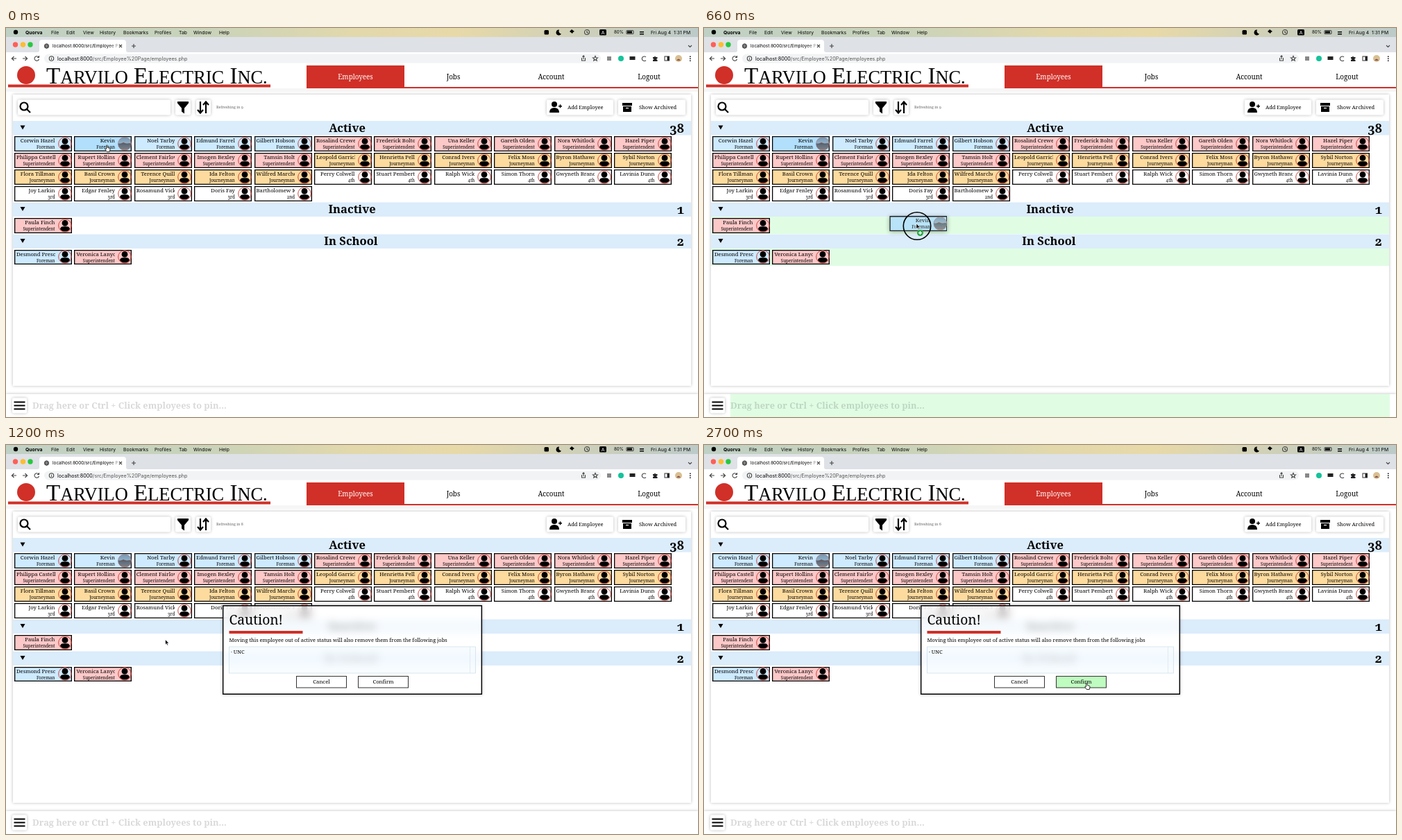
These frames come from a looping animation (997x561 px, 2730 ms). An HTML page:

```html
<!DOCTYPE html>
<html lang="en">
<head>
<meta charset="utf-8">
<title>Employees</title>
<style>
html, body { margin: 0; width: 997px; height: 561px; overflow: hidden; background: #fff; }
body { position: relative; font-family: "Noto Serif", serif; font-variant-numeric: oldstyle-nums; }
div, svg { position: absolute; box-sizing: border-box; }
svg { left: 0; top: 0; overflow: visible; }
.ui { font: 6.8px Inter, sans-serif; }
.mid { text-anchor: middle; }
.head { font-weight: 700; font-size: 16.5px; }
.count { font-weight: 700; font-size: 18px; text-anchor: end; }
.box { fill: #fff; filter: drop-shadow(0 0 2px #0004); }
.line { fill: none; stroke: #444; stroke-width: 1.1; }
.card { width: 83px; height: 21.5px; box-shadow: inset 0 0 0 1.3px #000; }
.card div { left: 3px; width: 55.5px; overflow: hidden; white-space: nowrap; text-align: right; }
.card .name { top: 1px; font-size: 7.7px; line-height: 10px; }
.card .role { top: 12px; font-size: 6.2px; line-height: 8px; }
.zone { left: 10px; width: 977px; background: #e0fde4; }
#pin { left: 38px; width: 950px; top: 528px; height: 33px; mix-blend-mode: multiply; }
#ghost { left: 0; top: 0; opacity: .85; filter: drop-shadow(0 1px 3px #0006); }
#modal { left: 311.5px; top: 231px; width: 374px; height: 128.5px; background: #ffffffb3;
  backdrop-filter: blur(6px); box-shadow: inset 0 0 0 1.4px #000, 0 0 4px #0005; }
</style>
</head>
<body>
<svg width="997" height="561">
  <defs>
    <linearGradient id="bar"><stop stop-color="#bfd0c4"/><stop offset=".3" stop-color="#cad3b9"/><stop offset=".5" stop-color="#e2d8ac"/><stop offset=".65" stop-color="#e8d9a8"/><stop offset=".82" stop-color="#cfd0b8"/><stop offset="1" stop-color="#bccac8"/></linearGradient>
    <linearGradient id="photo" x2="0" y2="1"><stop stop-color="#7797b4"/><stop offset=".45" stop-color="#8fb0c6"/><stop offset=".5" stop-color="#506c80"/><stop offset="1" stop-color="#8a7f80"/></linearGradient>
    <linearGradient id="fade"><stop offset=".85"/><stop offset="1" stop-opacity=".3"/></linearGradient>
    <path id="arrow" d="M-1-3.5v7.5l1.7-1.6 1.2 2.7 1.3-.6-1.2-2.6h2.3z" stroke="#fff" stroke-width=".7"/>
    <path id="hand" d="M-1.5-4.5q1-1 1.7 0v3l3 .8q1 .4.8 1.6l-.7 3.6h-4l-2.6-3.6q.3-1.2 1.8-.3z" fill="#fff" stroke="#000" stroke-width=".8"/>
  </defs>

  <!-- menu bar -->
  <rect width="997" height="13" fill="url(#bar)"/>
  <circle cx="14" cy="6" r="3.2"/>
  <g class="ui" id="menu"><text x="28" y="8.5" font-weight="700">Quorva</text>
    <text x="876" y="8.3" style="font-size:6.2px">80%</text><text x="929" y="8.5">Fri Aug 4&#160; 1:31 PM</text></g>
  <rect x="775.5" y="3" width="6.5" height="6.5" rx="1.5"/>
  <path d="M797 2.5a4 4 0 1 0 3 6 4 4 0 0 1-3-6M815 2l4 3-2 1-1 2-4-3zM814 6l-3 4"/>
  <circle class="line" cx="837" cy="6" r="3.5"/><path class="line" d="M837 4v2.5l2 1"/>
  <rect x="855" y="2" width="10" height="8.5" rx="1.5"/><text x="860" y="8.8" class="ui mid" fill="#fff">A</text>
  <rect class="line" x="894" y="3.5" width="10" height="5" rx="1.3"/><rect x="895" y="4.5" width="7" height="3"/>
  <path d="M913 5h6v1.5h-6zM913 8h6v1.5h-6z"/>

  <!-- tab strip and toolbar -->
  <rect y="13" width="997" height="23" fill="#dee1e6"/>
  <path d="M45 35q3 0 3-3V21q0-4 4-4h117q4 0 4 4v11q0 3 3 3z" fill="#fff"/>
  <rect y="35" width="997" height="19" fill="#fff"/>
  <rect x="55" y="37.5" width="802" height="13" rx="6.5" fill="#f1f3f4"/>
  <circle cx="13.5" cy="24" r="3.7" fill="#ff5f57"/><circle cx="24.5" cy="24" r="3.7" fill="#febc2e"/><circle cx="35" cy="24" r="3.7" fill="#28c840"/>
  <g class="line"><circle cx="58.5" cy="26" r="3"/><path d="M55.5 26h6M58.5 23q-3 3 0 6q3-3 0-6M163 24l4 4m0-4l-4 4M181 26h6m-3-3v6M983 25l2.5 2.5 2.5-2.5"/>
    <path d="M15 44H8.5l3-3m-3 3l3 3M24 44h6.5l-3-3m3 3l-3 3M47 42a3.3 3.3 0 1 0 .5 3M47.5 40v2.5h-2.5"/>
    <circle cx="65.5" cy="44" r="3.2"/><path d="M65.5 43.5v2.3M65.5 41.8v.8M829.5 43v4h5v-4M832 45v-5l-1.5 1.5M832 40l1.5 1.5M922 42a3.3 3.3 0 1 0 0 4.5"/>
    <path d="M849 40.5l1 2.3 2.5.2-2 1.6.7 2.4-2.2-1.3-2.2 1.3.7-2.4-2-1.6 2.5-.2z"/><rect x="949" y="41" width="6.5" height="6"/></g>
  <rect x="866" y="41" width="6" height="6" fill="#888"/><circle cx="886" cy="44" r="4" fill="#15c39a"/>
  <path d="M898.5 41h8v5h-8zM932 42h2q1-3 2 0h2.5v2q-3 1 0 2v2H932v-2q3-1 0-2zM952.5 41h3v6h-3z" fill="#222"/>
  <circle cx="969" cy="44" r="5" fill="#d9bf91"/><path d="M966 47q3-5 6 0z" fill="#855"/>
  <path d="M985 40.5h1.5v1.5H985zm0 3h1.5V45H985zm0 3h1.5V48H985z"/>
  <text class="ui" x="67" y="28.3" style="font-size:6.4px" fill="url(#fade)">localhost:8000/src/Employee P</text>
  <text class="ui" x="74" y="46.7" style="font-size:7.2px">localhost:8000<tspan fill="#555">/src/Employee%20Page/employees.php</tspan></text>

  <!-- page header -->
  <rect y="87" width="997" height="5" fill="#f6f6f6"/>
  <circle cx="29" cy="68" r="13" fill="#d03028"/><rect x="3" y="81.5" width="378" height="4" fill="#d03028"/>
  <text x="58" y="80" font-family="Liberation Serif, serif" font-size="33">T<tspan font-size="26.4">ARVILO</tspan> E<tspan font-size="26.4">LECTRIC</tspan> I<tspan font-size="26.4">NC.</tspan></text>
  <path d="M433 54h141v31h423v2H433z" fill="#d03028"/>
  <g class="mid" font-size="9.85"><text x="503.5" y="73.5" fill="#fff">Employees</text><text x="644.5" y="73.5">Jobs</text><text x="785.5" y="73.5">Account</text><text x="926.5" y="73.5">Logout</text></g>

  <!-- panel and controls -->
  <rect class="box" x="10" y="96" width="977" height="420"/>
  <g id="controls"></g>
  <g fill="none" stroke="#000" stroke-width="2.2"><circle cx="26" cy="113" r="5.5"/><path d="M30 117l5 5M280 106v16m-4-4l4 4.5 4-4.5M288 123v-16m-4 4l4-4.5 4 4.5"/></g>
  <path d="M247 106h16v2.5l-6 7v8l-4-3v-5l-6-7z"/>
  <circle cx="790" cy="110" r="4"/><path d="M783 122q0-7 7-7t7 7zM796 112h5v1.5h-5zM797.8 110.2h1.5v5h-1.5zM888 108h14v4h-14zM889 113h12v8h-12z"/><path d="M893 115.5h4" stroke="#fff" stroke-width="1.3"/>
  <g font-size="7.5"><text x="809" y="117">Add Employee</text><text x="912" y="117">Show Archived</text></g>
  <text id="refresh" x="303" y="116" font-size="5.4" fill="#666"></text>
  <g id="sections"></g>

  <!-- pin bar -->
  <rect class="box" y="528" width="997" height="40"/><rect class="box" x="9" y="533.5" width="21" height="22" rx="2"/>
  <path d="M11.5 539.5h16M11.5 544.5h16M11.5 549.5h16" stroke="#000" stroke-width="2.2"/>
  <text x="38" y="549" font-size="12.75" font-weight="700" fill="#d9d9d9">Drag here or Ctrl + Click employees to pin...</text>
</svg>

<div id="zones">
  <div class="zone" style="top:272px;height:25px"></div><div class="zone" style="top:318px;height:24.5px"></div>
</div>
<div class="zone" id="pin"></div>
<div id="cards"></div>

<div id="modal"><svg width="374" height="128"><g transform="translate(-311.5 -231)">
  <text x="321" y="259" font-size="19.2">Caution!</text><rect x="321" y="268" width="106" height="4" fill="#d03028"/>
  <text x="321" y="284" font-size="7.5">Moving this employee out of active status will also remove them from the following jobs</text>
  <rect x="321" y="291" width="355" height="38" fill="#eef7ff66" stroke="#cfe0ea" stroke-width=".8"/><path d="M668 291v38" stroke="#dce8ef" stroke-width=".8"/>
  <text x="323.5" y="301" font-size="7.5">· UNC</text>
  <g stroke="#333" fill="#fff"><rect x="418" y="333.5" width="72" height="16.5"/><rect id="confirm" x="507" y="333.5" width="72" height="16.5"/></g>
  <g class="mid" font-size="7.7"><text x="454" y="344.3">Cancel</text><text x="543" y="344.3">Confirm</text></g>
</g></svg></div>

<div id="ghost"></div>
<svg width="997" height="561"><g id="pointer">
  <circle id="ring" fill="none" stroke="#000" stroke-width="1.6"/>
  <use id="arrowUse" href="#arrow"/><use id="handUse" href="#hand"/>
  <g id="plus"><circle cx="4.5" cy="10" r="4.5" fill="#28a745"/><path d="M2 10h5M4.5 7.5v5" stroke="#fff" stroke-width="1.3"/></g>
</g></svg>

<script>
const $ = id => document.getElementById(id);
const show = (id, on) => $(id).style.display = on ? '' : 'none';
const LOOP = 2730, PRESS = 220, DRAG = 270, DROP = 960;

const menu = { File: 65, Edit: 87, View: 111, History: 135, Bookmarks: 169, Profiles: 214, Tab: 249, Window: 270, Help: 307 };
for (const item in menu) $('menu').innerHTML += `<text x="${menu[item]}" y="8.5">${item}</text>`;
$('controls').innerHTML = [[17, 220], [244, 22], [274, 21], [779, 96], [882, 97]]
  .map(([x, w]) => `<rect class="box" x="${x}" y="103.5" width="${w}" height="22" rx="2"/>`).join('');
$('sections').innerHTML = [['Active', 134, 38, 491.5], ['Inactive', 251.5, 1, 498.5], ['In School', 297.5, 2, 497]]
  .map(([title, y, n, x]) => `<rect x="10" y="${y}" width="977" height="20.5" fill="#dbecfb"/>
    <path d="M20.5 ${y + 6.5}h7l-3.5 6z"/><text class="head mid" x="${x}" y="${y + 15.7}">${title}</text>
    <text class="count" x="977" y="${y + 16.6}">${n}</text>`).join('');

const colours = { Foreman: '#cdeaff', Superintendent: '#fcc8c8', Journeyman: '#fddb9f' };
const person = '<circle cx="10" cy="6.4" r="4.4"/><path d="M3 15q.5-3.8 4.5-3.8h5q4 0 4.5 3.8a8.6 8.6 0 0 1-14 0"/><circle cx="10" cy="10" r="9.3" fill="none" stroke="#c8372f" stroke-width=".9"/>';
const photo = '<circle cx="10" cy="10" r="9.5" fill="url(#photo)" stroke="#a66" stroke-width=".6"/><path d="M2 11l6-3 5 2 5-1v2z" fill="#6b5b60"/>';
const face = (name, role) => `<div class="name">${name}</div><div class="role">${role}</div>
  <svg width="20" height="20" style="left:62.5px;top:.8px">${name == 'Kevin' ? photo : person}</svg>`;

function addCards(names, y, roleAt) {
  names.split(',').forEach((name, i) => {
    const role = roleAt(i), card = document.createElement('div');
    card.className = 'card';
    card.style.cssText = `left:${12 + i % 11 * 86.4}px;top:${y + (i / 11 | 0) * 24.1}px;background:${colours[role] || '#fff'}`;
    card.innerHTML = face(name, role);
    $('cards').append(card);
  });
}
const ranks = [['Foreman', 5], ['Superintendent', 16], ['Journeyman', 27], ['4th', 33], ['3rd', 37], ['2nd', 38]];
addCards('Corwin Hazel,Kevin,Noel Tarby,Edmund Farrel,Gilbert Hobson,Rosalind Crewe,Frederick Bolton,Una Keller,Gareth Olden,Nora Whitlock,Hazel Piper,' +
  'Philippa Castellan,Rupert Hollins,Clement Fairlow,Imogen Bexley,Tamsin Holt,Leopold Garrick,Henrietta Pell,Conrad Ivers,Felix Moss,Byron Hathaway,Sybil Norton,' +
  'Flora Tillman,Basil Crown,Terence Quill,Ida Felton,Wilfred Marchetti,Perry Colwell,Stuart Pemberton,Ralph Wick,Simon Thorn,Gwyneth Brand,Lavinia Dunn,' +
  'Joy Larkin,Edgar Fenley,Rosamund Vickery,Doris Fay,Bartholomew Kersey', 156, i => ranks.find(r => i < r[1])[0]);
addCards('Paula Finch', 274, () => 'Superintendent');
addCards('Desmond Prescot,Veronica Lanyon', 319.5, i => ['Foreman', 'Superintendent'][i]);

const dragged = $('cards').children[1];
$('ghost').className = 'card';
$('ghost').style.background = '#b2dffc';
$('ghost').innerHTML = face('Kevin', 'Foreman');

// Keys are [time, x, y]
const pointerPath = [[250, 146, 174], [360, 176, 174], [510, 317, 268], [600, 318, 284], [870, 231.5, 288], [DROP, 230.5, 284],
  [1230, 230.5, 284], [1800, 455, 321], [2550, 552, 348]];
const ghostPath = [[DRAG, 99, 156], [360, 114.5, 158.5], [510, 278, 250], [600, 279, 268], [870, 188, 276.5], [DROP, 187, 273]];

// Monotone cubic through the keys
function follow(keys, t) {
  const last = keys.length - 1;
  if (t <= keys[0][0]) return keys[0].slice(1);
  if (t >= keys[last][0]) return keys[last].slice(1);
  const i = keys.findIndex(k => k[0] > t) - 1, [a, b] = [keys[i], keys[i + 1]];
  const span = b[0] - a[0], u = (t - a[0]) / span;
  return [1, 2].map(c => {
    const rate = j => j < 0 || j >= last ? 0 : (keys[j + 1][c] - keys[j][c]) / (keys[j + 1][0] - keys[j][0]);
    const slope = j => { const p = rate(j - 1), q = rate(j); return p * q > 0 ? 2 * p * q / (p + q) : 0; };
    const ease = u * u * (3 - 2 * u);
    return a[c] + (b[c] - a[c]) * ease + span * u * (1 - u) * (slope(i) * (1 - u) - slope(i + 1) * u);
  });
}

function draw() {
  const t = performance.now() % LOOP;
  const [x, y] = follow(pointerPath, t), [gx, gy] = follow(ghostPath, t);
  const dragging = t >= DRAG && t < DROP, overHeader = y > 251 && y < 272;
  const onConfirm = t > DROP && x > 507 && y > 333.5, hand = t < DRAG || onConfirm;
  for (const id of ['zones', 'pin', 'ghost']) show(id, dragging);
  show('modal', t >= DROP);
  show('ring', t >= PRESS && t < DROP);
  show('plus', dragging && !overHeader);
  show('handUse', hand);
  show('arrowUse', !hand);
  $('ring').setAttribute('r', dragging && !overHeader ? 19.7 : 10.8);
  $('pointer').setAttribute('transform', `translate(${x} ${y})`);
  $('ghost').style.transform = `translate(${gx}px,${gy}px)`;
  $('confirm').style.fill = onConfirm ? '#bffcc0' : '#fff';
  dragged.style.background = t < DROP ? '#b2dffc' : colours.Foreman;
  $('refresh').textContent = 'Refreshing in ' + (9 - Math.floor((t + 210) / 900));
  requestAnimationFrame(draw);
}
draw();
</script>
</body>
</html>
```
